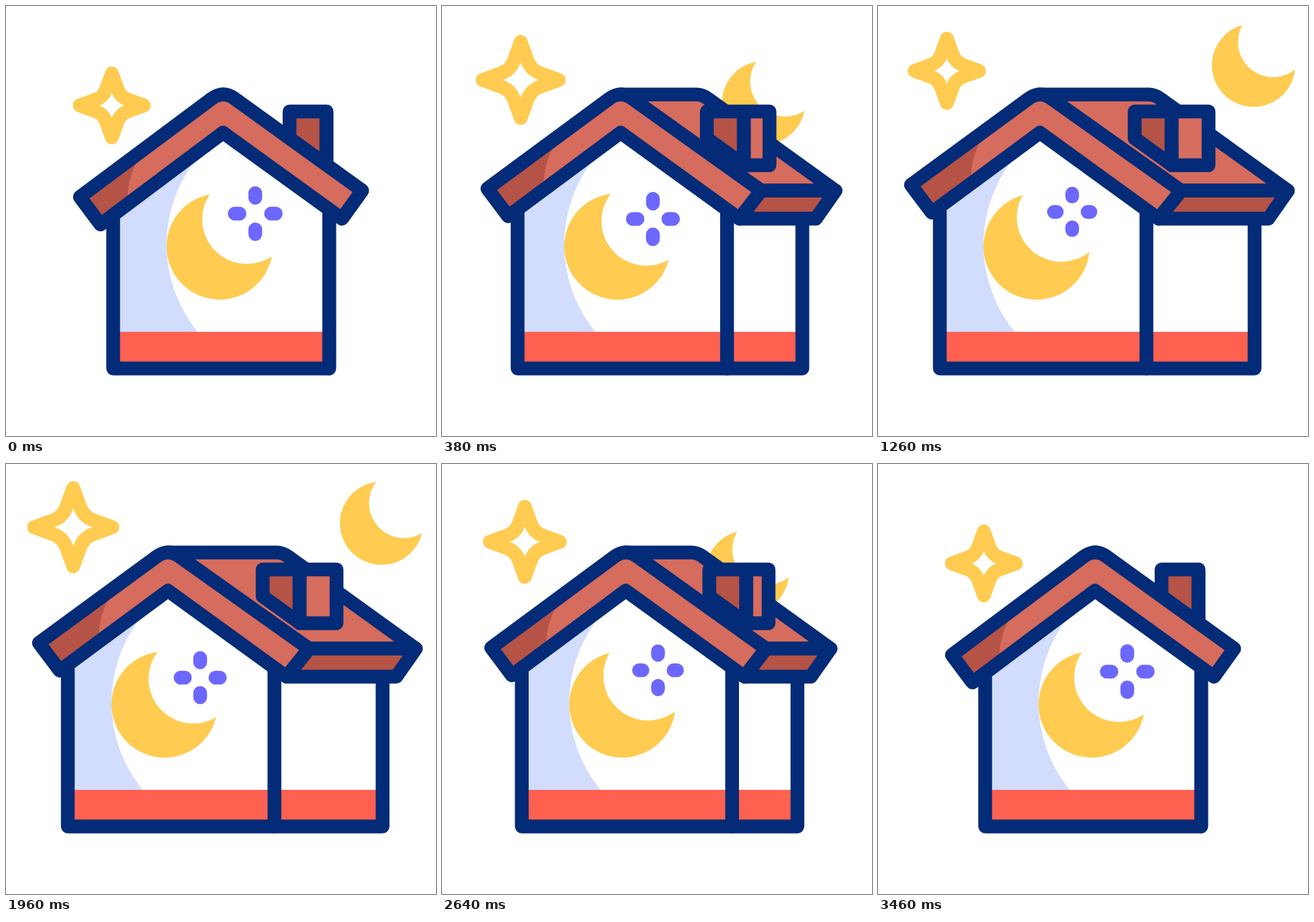
Animation of 640x640 px, one loop 3.6 s. Source, as an HTML page with a canvas:

```html
<!DOCTYPE html>
<html lang="en">
<head>
<meta charset="utf-8">
<title>House at night</title>
<style>
html, body { margin: 0; width: 100%; height: 100%; overflow: hidden; background: #fff; }
canvas { display: block; width: 640px; height: 640px; }
</style>
</head>
<body>
<canvas id="stage"></canvas>
<script>
const LOOP = 3600, LINE = 20.5;
const NAVY = '#032b77', ROOF = '#d66c5d', SHADE = '#b55347', RED = '#ff6151',
      MIST = '#d2dcfd', GOLD = '#ffcb50', VIOLET = '#6c67ff', WHITE = '#fff';

const canvas = document.getElementById('stage');
const ctx = canvas.getContext('2d');
const dpr = window.devicePixelRatio || 1;
canvas.width = canvas.height = 640 * dpr;

// Smoothly eased value between [time, value] keys.
function ease(keys, t) {
  if (t <= keys[0][0]) return keys[0][1];
  for (let i = 1; i < keys.length; i++) {
    const [t0, a] = keys[i - 1], [t1, b] = keys[i];
    if (t < t1) {
      const u = (t - t0) / (t1 - t0);
      return a + (b - a) * u * u * (3 - 2 * u);
    }
  }
  return keys[keys.length - 1][1];
}

const beats = (...values) => values.map((v, i) => [i * 600, v]);
const OPEN = [[26, 0], [586, 1], [2400, 1], [2960, 0]];
const PULSE = [...beats(0, 1, 0, 1, 0, 1), [3470, 0]];
const SWAY = beats(0, 5, -5, 5, -5, 0);
const FAR_SWAY = beats(-10, 5, -5, 5, -5, 0);
const BOB = beats(309, 320.5, 306, 320.5, 306, 309);
const REACH = beats(27, 26.2, 25, 26.2, 25, 27);
const DASH = beats(3.5, 3.5, 2, 3.5, 2, 3.5);

function shape(points, closed = true) {
  const path = new Path2D();
  points.forEach(([x, y], i) => i ? path.lineTo(x, y) : path.moveTo(x, y));
  if (closed) path.closePath();
  return path;
}

function fill(path, color) {
  ctx.fillStyle = color;
  ctx.fill(path);
}

function stroke(path, color = NAVY) {
  ctx.strokeStyle = color;
  ctx.stroke(path);
}

function rect(x0, y0, x1, y1, color) {
  ctx.fillStyle = color;
  ctx.fillRect(x0, y0, x1 - x0, y1 - y0);
}

function moon(x, y, size, degrees) {
  const dir = -Math.PI / 4;
  ctx.save();
  ctx.translate(x, y);
  ctx.scale(size, size);
  ctx.rotate(degrees * Math.PI / 180);
  ctx.beginPath();
  ctx.arc(0, 0, 79, dir + 0.973, dir - 0.973);
  ctx.arc(40.5, -40.5, 66.5, dir + Math.PI + 1.377, dir + Math.PI - 1.377, true);
  ctx.closePath();
  ctx.fillStyle = GOLD;
  ctx.fill();
  ctx.restore();
}

function star(x, y, r) {
  const path = new Path2D();
  for (let i = 0; i < 4; i++) {
    const c = Math.cos(i * Math.PI / 2) * r, s = Math.sin(i * Math.PI / 2) * r;
    const at = (u, v) => [x + u * c - v * s, y + u * s + v * c];
    i ? path.lineTo(...at(0, -1)) : path.moveTo(...at(0, -1));
    path.lineTo(...at(0.18, -0.505));
    path.quadraticCurveTo(...at(0.267, -0.267), ...at(0.505, -0.18));
  }
  path.closePath();
  stroke(path, GOLD);
}

function sparkle(x, y, reach, half) {
  const path = new Path2D();
  for (const [u, v] of [[0, -1], [1, 0], [0, 1], [-1, 0]]) {
    path.moveTo(x + u * (reach - half), y + v * (reach - half));
    path.lineTo(x + u * (reach + half), y + v * (reach + half));
  }
  stroke(path, VIOLET);
}

function draw(t) {
  const p = ease(OPEN, t), pulse = ease(PULSE, t);
  const mix = (a, b) => a + (b - a) * p;
  const apex = mix(323, 241), ridge = mix(323, 403);
  const left = mix(159.5, 92), right = mix(481, 399.5), far = mix(481, 560.5);
  const tip = [mix(530, 451), 274.8], eave = [mix(500, 417.5), 316.5];
  const farTip = [mix(530, 610), 274.8], farEave = [mix(500, 581), 316.5];

  ctx.setTransform(dpr, 0, 0, dpr, 0, 0);
  ctx.lineWidth = LINE;
  ctx.lineJoin = ctx.lineCap = 'round';
  rect(0, 0, 640, 640, WHITE);

  star(mix(157.5, 102.6) - 3.1 * pulse, mix(148, 96.6) - 3.1 * pulse, 47.6 + 13 * pulse);
  moon(mix(295, 559), mix(272, 88), 0.785, ease(FAR_SWAY, t));

  // Side wall
  rect(right, 300, far, 539.5, WHITE);
  rect(right, 485, far, 539.5, RED);
  stroke(shape([[right, 539.5], [far, 539.5], [far, 305]], false));

  // Side roof
  const slope = new Path2D();
  slope.moveTo(apex, 131.7);
  slope.lineTo(ridge, 131.7);
  slope.quadraticCurveTo(ridge + 8.5, 131.7, ridge + 17, 137.8);
  slope.lineTo(...farTip);
  slope.lineTo(...tip);
  slope.closePath();
  const fascia = shape([tip, farTip, farEave, eave]);
  fill(slope, ROOF);
  fill(fascia, SHADE);
  stroke(slope);
  stroke(fascia);

  // Chimney
  const c0 = mix(422, 382), c1 = mix(477, 437), c2 = mix(477, 492);
  const flank = shape([[c0, 157], [c1, 157], [c1, 236.5], [c0, 197]]);
  const face = shape([[c1, 157], [c2, 157], [c2, 237], [c1, 237]]);
  fill(flank, SHADE);
  fill(face, ROOF);
  stroke(flank);
  stroke(face);

  // Front wall
  const wall = shape([[left, 305], [apex, 188.5], [right, 305], [right, 539.5], [left, 539.5]]);
  fill(wall, MIST);
  ctx.save();
  ctx.clip(wall);
  ctx.beginPath();
  ctx.arc(apex + 121, 355, 205, 0, Math.PI * 2);
  ctx.fillStyle = WHITE;
  ctx.fill();
  rect(left, 485, right, 539.5, RED);
  ctx.restore();
  moon(apex - 5, 358, 1, ease(SWAY, t));
  sparkle(apex + 48, ease(BOB, t), ease(REACH, t), ease(DASH, t));
  stroke(shape([[left, 305], [left, 539.5], [right, 539.5], [right, 305]], false));

  // Front roof
  const gable = new Path2D();
  gable.moveTo(mix(110, 49), mix(284.3, 266.3));
  gable.lineTo(apex - 17, 138);
  gable.quadraticCurveTo(apex, 125.4, apex + 17, 137.7);
  gable.lineTo(...tip);
  gable.lineTo(...eave);
  gable.lineTo(apex, 188.5);
  gable.lineTo(mix(140.5, 80), mix(325.2, 307.5));
  gable.closePath();
  fill(gable, ROOF);
  ctx.save();
  ctx.clip(gable);
  ctx.translate(-42.5 * p, -30 * p);
  ctx.beginPath();
  ctx.moveTo(203, 220);
  ctx.quadraticCurveTo(178, 252, 181, 300);
  ctx.lineTo(181, 400);
  ctx.lineTo(60, 400);
  ctx.lineTo(60, 220);
  ctx.fillStyle = SHADE;
  ctx.fill();
  ctx.restore();
  stroke(gable);
}

const start = performance.now();
function tick() {
  draw((performance.now() - start) % LOOP);
  requestAnimationFrame(tick);
}
tick();
</script>
</body>
</html>
```
